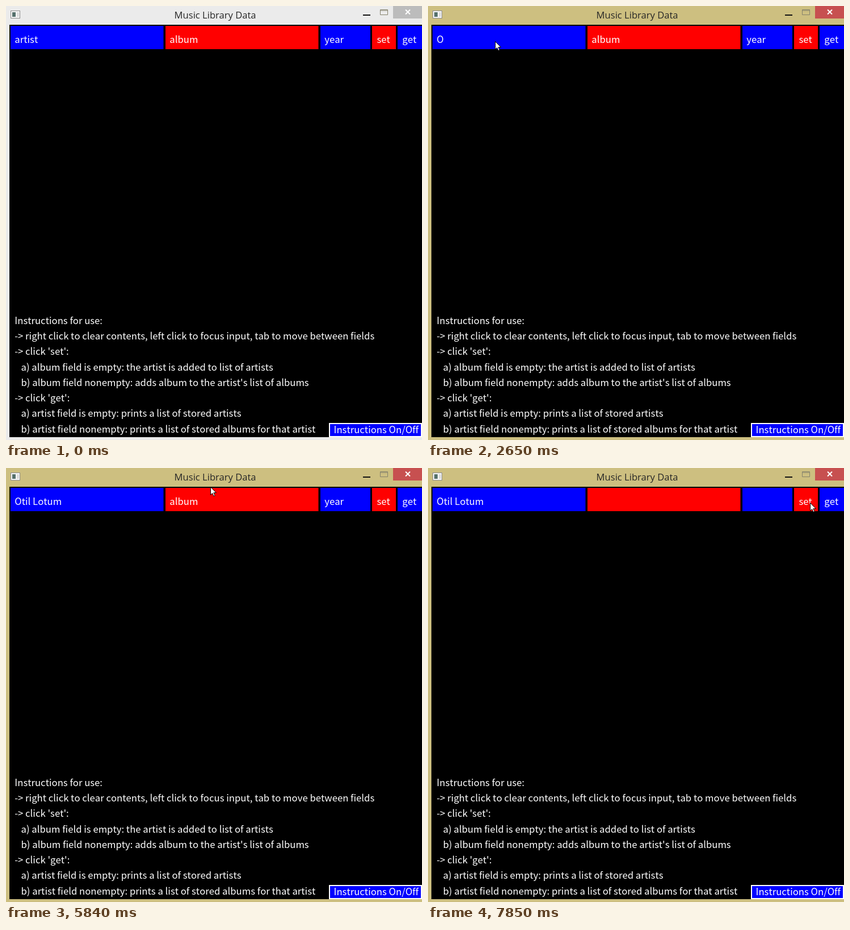
Write an HTML page that moves like this. It is 733 px wide and 764 px high and loops after 8 s.

```html
<!DOCTYPE html>
<html lang="en">
<head>
<meta charset="utf-8">
<title>Music Library Data</title>
<style>
  html, body { margin: 0; width: 100%; height: 100%; overflow: hidden; }
  svg { display: block; }

  text {
    font: 16.72px "Noto Sans CJK JP", "Noto Sans CJK SC", "Noto Sans", sans-serif;
    font-kerning: none;
    font-variant-ligatures: none;
    white-space: pre;
    fill: #fff;
  }
  .title { font: 16.6px "Open Sans", "Noto Sans", sans-serif; fill: #262626; }
  .blue { fill: #00f; }
  .red { fill: #f00; }

  /* Everything changes in hard steps on one shared 8 s clock. */
  .frame, .close, .cover, .cursor, .click, .artist, .album, .year {
    animation: 8s step-end infinite;
  }
  .frame { animation-name: frame; }
  .close { animation-name: close; }
  .artist { animation-name: clear-artist; }
  .album { animation-name: clear-album; }
  .year { animation-name: clear-year; }
  .cover { animation-name: type; font-size: 16.72px; }
  .cursor { animation-name: move; }
  .click { animation-name: click; fill: rgba(255, 255, 0, .5); }

  @keyframes frame { 0% { fill: #ebebeb; } 20.625%, 100% { fill: #cdbf80; } }
  @keyframes close { 0% { fill: #bcbcbc; } 20.625%, 100% { fill: #c75050; } }

  @keyframes clear-artist { 0% { opacity: 1; } 21.375%, 100% { opacity: 0; } }
  @keyframes clear-album { 0% { opacity: 1; } 78.875%, 100% { opacity: 0; } }
  @keyframes clear-year { 0% { opacity: 1; } 90.375%, 100% { opacity: 0; } }

  @keyframes click {
    0%, 22.625%, 79.875%, 90.375%, 100% { opacity: 0; }
    20.625%, 77.875%, 88.375% { opacity: 1; }
  }

  /* The cover slides off the name one key press at a time. */
  @keyframes type {
    0% { transform: translateX(0); }
    33.125% { transform: translateX(.742em); }
    36.875% { transform: translateX(1.119em); }
    39.75% { transform: translateX(1.394em); }
    41.875% { transform: translateX(1.678em); }
    47.75% { transform: translateX(2.445em); }
    51.5% { transform: translateX(3.428em); }
    57.5% { transform: translateX(4.036em); }
    61.25%, 100% { transform: translateX(5.1em); }
  }

  @keyframes move {
    0% { transform: translate(-50px, 0); }
    3.75% { transform: translate(540px, 650px); }
    4.625% { transform: translate(400px, 380px); }
    5.625% { transform: translate(230px, 160px); }
    6.75% { transform: translate(140px, 80px); }
    8% { transform: translate(118px, 63px); }
    10.625% { transform: translate(118px, 62px); }

    67.125% { transform: translate(100px, 78px); }
    68.125% { transform: translate(68px, 86px); }
    69.125% { transform: translate(130px, 70px); }
    70.125% { transform: translate(260px, 35px); }
    71.125% { transform: translate(370px, 19px); }
    72% { transform: translate(400px, 20px); }
    73% { transform: translate(360px, 33px); }
    74% { transform: translate(315px, 51px); }
    76.125% { transform: translate(314px, 53px); }

    79.875% { transform: translate(330px, 56px); }
    80.75% { transform: translate(385px, 62px); }
    81.75% { transform: translate(450px, 67px); }
    82.75% { transform: translate(509px, 67px); }
    83.625% { transform: translate(545px, 64px); }
    84.625% { transform: translate(562px, 58px); }
    85.625% { transform: translate(571px, 53px); }
    86.5% { transform: translate(576px, 50px); }
    87.5% { transform: translate(577px, 48px); }

    91.375% { transform: translate(582px, 49px); }
    92.375% { transform: translate(600px, 54px); }
    93.25% { transform: translate(632px, 64px); }
    94.25% { transform: translate(660px, 71px); }
    95.25% { transform: translate(676px, 74px); }
    96.125% { transform: translate(680px, 72px); }
    97.125% { transform: translate(677px, 66px); }
    98.125%, 100% { transform: translate(673px, 61px); }
  }
</style>
</head>
<body>
<svg width="733" height="764" viewBox="0 0 733 764">
  <!-- window frame -->
  <rect class="frame" width="733" height="764"/>
  <rect x="8.5" y="8.5" width="16" height="13" fill="#f6f6f6" stroke="#8c8c8c"/>
  <rect x="11" y="11" width="6" height="8" fill="#55706c"/>
  <path d="M19 11h4v8h-4z" fill="#dcdcdc"/>
  <text class="title" x="296.6" y="22">Music Library Data</text>
  <rect x="629" y="15" width="13" height="2" fill="#111"/>
  <path d="M659.5 6.5h13v9h-13zM660 8h12" fill="none" stroke="#85826c"/>
  <rect class="close" x="682" width="51" height="22"/>
  <path d="M704 6.5l8 8m0-8l-8 8" stroke="#fff" stroke-width="2"/>
  <rect x="6" y="33" width="727" height="726"/>

  <!-- fields -->
  <rect class="blue" x="8" y="35" width="269.5" height="41"/>
  <rect class="red" x="281" y="35" width="269.5" height="41"/>
  <rect class="blue" x="554" y="35" width="88" height="41"/>
  <rect class="red" x="645" y="35" width="42" height="41"/>
  <rect class="blue" x="690" y="35" width="43" height="41"/>
  <text x="15.3" y="65">Otil Lotum</text>
  <rect class="blue cover" x="15.3" y="40" width="100" height="32"/>
  <text class="artist" x="15.3" y="65">artist</text>
  <text class="album" x="288.3" y="65">album</text>
  <text class="year" x="561.2" y="65">year</text>
  <text x="653.5" y="65">set</text>
  <text x="698.3" y="65">get</text>

  <!-- instructions -->
  <text x="15.3" y="560">Instructions for use:</text>
  <text x="15.3" y="587">-&gt; right click to clear contents, left click to focus input, tab to move between fields</text>
  <text x="15.3" y="614">-&gt; click 'set':</text>
  <text x="15.3" y="642">   a) album field is empty: the artist is added to list of artists</text>
  <text x="15.3" y="669">   b) album field nonempty: adds album to the artist's list of albums</text>
  <text x="15.3" y="696">-&gt; click 'get':</text>
  <text x="15.3" y="723">   a) artist field is empty: prints a list of stored artists</text>
  <text x="15.3" y="751">   b) artist field nonempty: prints a list of stored albums for that artist</text>
  <rect class="blue" x="570" y="735" width="162" height="23" stroke="#fff" stroke-width="2"/>
  <text x="577.5" y="752">Instructions On/Off</text>

  <!-- pointer -->
  <g class="cursor">
    <path d="M.5 .5V14.3L3.6 11.4L6 16.5L8.2 15.5L5.9 10.6H10.4Z" fill="#fff" stroke="#000"/>
    <circle class="click" cx=".5" r="13.7"/>
  </g>
</svg>
</body>
</html>
```
